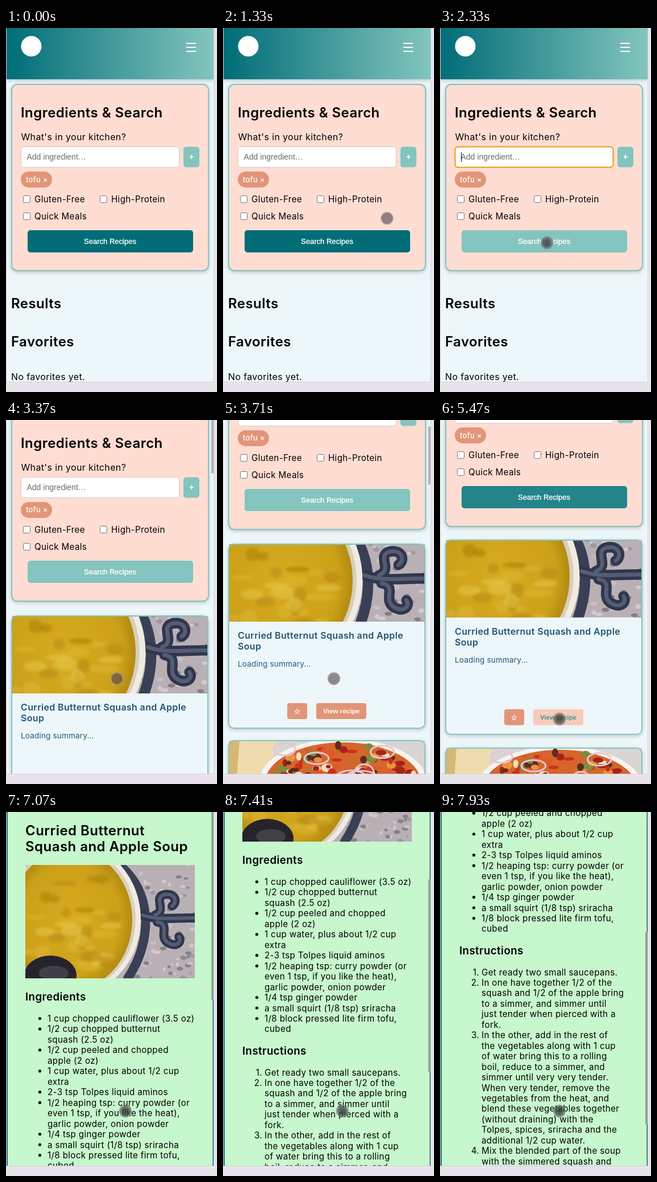
Animation, 371 px wide and 639 px high, one loop 8 s. Source, as an HTML page:

```html
<!DOCTYPE html>
<html lang="en">
<head>
<meta charset="utf-8">
<title>Recipe finder</title>
<style>
html, body { margin: 0; width: 100%; height: 100%; overflow: hidden; background: #e9e4ec; }
#stage { display: block; width: 371px; height: 639px; }
text { font-family: Inter, "Open Sans", sans-serif; font-size: 16px; letter-spacing: .022em; white-space: pre; }
.h2 { font-size: 24px; font-weight: 600; letter-spacing: .019em; }
.h3 { font-size: 18.7px; font-weight: 600; }
.small { font-size: 15.2px; }
.name { font-weight: 600; fill: #1f5577; }
.note { font-size: 13.6px; fill: #1f5b79; letter-spacing: .01em; }
.tag { font-size: 13px; font-weight: 500; fill: #fff; }
.ui { font-family: "Liberation Sans", Arial, sans-serif; font-size: 13px; letter-spacing: 0; }
.firm { fill: #fff; stroke: #fff; stroke-width: .35px; }
.star { font: bold 13px "DejaVu Sans", sans-serif; }
.mid { text-anchor: middle; }
.end { text-anchor: end; }
.box { filter: drop-shadow(0 2px 3px rgba(0, 0, 0, .2)); }
</style>
</head>
<body>
<svg id="stage" viewBox="0 0 371 639"></svg>
<script>
const DARK = [0, 109, 119], LIGHT = [131, 197, 190], CLAY = [226, 149, 120],
      PEACH = [255, 221, 210], WHITE = [255, 255, 255];
const LOOP = 8000;

let seed = 7;
const rand = (a, b) => {
  seed = (seed * 16807) % 2147483647;
  return a + (b - a) * seed / 2147483647;
};
const pick = list => list[Math.floor(rand(0, list.length))];
const many = (n, make) => Array.from({ length: n }, make).join('');

const text = (x, y, s, cls = '', extra = '') => `<text x="${x}" y="${y}" class="${cls}" ${extra}>${s}</text>`;
const rect = (x, y, w, h, fill, r = 0, extra = '') =>
  `<rect x="${x}" y="${y}" width="${w}" height="${h}" rx="${r}" fill="${fill}" ${extra}/>`;
const oval = (x, y, rx, ry, fill, extra = '') =>
  `<ellipse cx="${x}" cy="${y}" rx="${rx}" ry="${ry}" fill="${fill}" ${extra}/>`;
const line = (d, color, w) =>
  `<path d="${d}" fill="none" stroke="${color}" stroke-width="${w}" stroke-linecap="round"/>`;
const photo = (x, y, w, h, id, vw, vh) =>
  `<svg x="${x}" y="${y}" width="${w}" height="${h}" viewBox="0 0 ${vw} ${vh}" preserveAspectRatio="xMidYMid slice"><use href="#${id}"/></svg>`;

function soup() {
  const lace = many(110, () => oval(rand(150, 298), rand(0, 199), rand(2, 6), rand(2, 4),
    pick(['#ddd5d6', '#978e98', '#cec6c9', '#706a7a']), 'opacity=".7"'));
  const lumps = many(30, () => oval(rand(0, 160), rand(10, 180), rand(8, 25), rand(4, 12),
    pick(['#e8c94e', '#a87a08', '#dfb835', '#b5850f']), 'opacity=".5"'));
  const arms = ['M206 88C235 98 260 92 300 93', 'M228 88C250 80 224 58 244 52C264 48 268 66 258 72',
    'M232 100C256 104 234 124 250 136C266 146 276 134 270 126'];
  return rect(0, 0, 298, 199, '#b9b0b5') + lace +
    line('M165 0C222 45 226 130 180 199', '#394056', 16) +
    arms.map(d => line(d, '#30364c', 16)).join('') +
    arms.map(d => line(d, '#555d74', 6)).join('') +
    oval(85, 95, 118, 132, '#f0ebe1') + oval(80, 95, 114, 128, '#d9cfba') + oval(80, 96, 108, 123, 'url(#broth)') +
    `<g filter="url(#soft)">${lumps}</g>` +
    oval(44, 194, 46, 35, '#26242a') + oval(50, 190, 26, 13, '#56545a', 'opacity=".6"');
}

function salad() {
  const bits = many(150, () => {
    const a = rand(0, 6.28), r = Math.sqrt(rand(0, 1));
    return oval(200 + 128 * r * Math.cos(a), 72 + 66 * r * Math.sin(a), rand(4, 10), rand(3, 8),
      pick(['#c9311c', '#dd5a25', '#e9933f', '#f0dfbb', '#a3231b', '#7d8c3b', '#5b2c22']));
  });
  const rings = many(9, () => oval(rand(90, 300), rand(5, 100), rand(16, 32), rand(8, 18), 'none',
    'stroke="#e6c6d3" stroke-width="3"'));
  return rect(0, 0, 344, 136, '#d9d5d3') + '<path d="M0 0H80L64 136H0z" fill="#eedcae"/>' +
    '<path d="M0 0H18L8 136H0z" fill="#d5b873"/>' +
    oval(200, 74, 148, 78, '#f7f4f1') + oval(200, 74, 137, 71, '#d6652c') + bits + rings;
}

function card(id, image, title) {
  return rect(9, 0, 347, 325, '#edf6f9', 10, `class="box" id="${id}Back"`) +
    `<g clip-path="url(#top)">${image}</g>` +
    rect(10, 1, 345, 323, 'none', 9, `id="${id}Edge" stroke="#83c5be" stroke-width="2"`) +
    title.map((s, i) => text(26, 167 + 19 * i, s, 'name')).join('') +
    text(26, 216, 'Loading summary...', 'note') +
    `<g id="${id}Foot">` + rect(113, 280, 35, 28, '#e29578', 4) +
    text(130.5, 299, '☆', 'mid firm star') +
    rect(164, 280, 88, 28, '#e29578', 4, `id="${id}View"`) +
    text(208, 298, 'View recipe', 'ui mid', `id="${id}Label" fill="#fff" style="font-size:11.7px;font-weight:bold"`) + '</g>';
}

const check = (x, y, s) => rect(x + .5, y + .5, 12, 12, '#fff', 2, 'stroke="#767676"') + text(x + 20, y + 12, s, 'small');

const home = `
  <rect x="0" y="0" width="366" height="4000" fill="#edf6f9"/>
  ${rect(1, -30, 364, 120, 'url(#bar)', 0, 'class="box"')}
  <circle cx="44.5" cy="32" r="18" fill="#fff"/>
  ${[26, 33, 40].map(y => rect(317, y, 17, 2, '#fff')).join('')}
  ${rect(10, 99, 346, 327, '#ffddd2', 10, 'class="box" stroke="#83c5be" stroke-width="2"')}
  ${text(26, 157, 'Ingredients &amp; Search', 'h2')}
  ${text(26.5, 197, "What's in your kitchen?")}
  ${rect(26.5, 208.5, 278, 36, '#fff', 5, 'id="field"')}
  ${text(36.5, 231, 'Add ingredient…', 'ui', 'style="font-size:14px" fill="#6a6a6a"')}
  ${rect(37, 218, 1, 17, '#000', 0, 'id="caret"')}
  ${rect(312, 208.5, 28, 36, '#83c5be', 5)}
  ${text(326, 231, '+', 'ui mid', 'fill="#fff" style="font-weight:bold;font-size:14px"')}
  ${rect(26, 252, 55, 28, '#e29578', 14)}${text(35, 270.5, 'tofu ×', 'tag')}
  ${check(30, 294, 'Gluten-Free')}${check(165, 294, 'High-Protein')}${check(30, 324, 'Quick Meals')}
  ${rect(38, 355, 291, 39, '#006d77', 5, 'id="search"')}
  ${text(183, 379, 'Search Recipes', 'ui mid firm')}
  <g id="empty">${text(9, 492, 'Results', 'h2')}${text(9, 559, 'Favorites', 'h2')}${text(9, 618, 'No favorites yet.')}</g>
  <g id="cards">
    <g id="first">${card('a', photo(11, 1, 344, 136, 'soup', 298, 199), ['Curried Butternut Squash and Apple', 'Soup'])}</g>
    <g id="second">${card('b', photo(11, 1, 344, 136, 'salad', 344, 136), [])}</g>
  </g>`;

const ingredients = ['*1 cup chopped cauliflower (3.5 oz)', '*1/2 cup chopped butternut', 'squash (2.5 oz)',
  '*1/2 cup peeled and chopped', 'apple (2 oz)', '*1 cup water, plus about 1/2 cup', 'extra',
  '*2-3 tsp Tolpes liquid aminos', '*1/2 heaping tsp: curry powder (or', 'even 1 tsp, if you like the heat),',
  'garlic powder, onion powder', '*1/4 tsp ginger powder', '*a small squirt (1/8 tsp) sriracha',
  '*1/8 block pressed lite firm tofu,', 'cubed'];
const steps = ['*Get ready two small saucepans.', '*In one have together 1/2 of the',
  'squash and 1/2 of the apple bring', 'to a simmer, and simmer until', 'just tender when pierced with a', 'fork.',
  '*In the other, add in the rest of', 'the vegetables along with 1 cup', 'of water bring this to a rolling',
  'boil, reduce to a simmer, and', 'simmer until very very tender.', 'When very tender, remove the',
  'vegetables from the heat, and', 'blend these vegetables together', '(without draining) with the',
  'Tolpes, spices, sriracha and the', 'additional 1/2 cup water.', '*Mix the blended part of the soup',
  'with the simmered squash and'];

// Lines that begin an item carry a leading star.
function list(lines, y, numbered) {
  let n = 0;
  return lines.map((s, i) => {
    const base = y + 18.46 * i, starts = s[0] === '*';
    const mark = !starts ? '' : numbered ? text(69, base, ++n + '.', 'small end') : oval(59.5, base - 5.5, 2.6, 2.6, '#000');
    return mark + text(73, base, starts ? s.slice(1) : s, 'small');
  }).join('');
}

const recipe = `
  ${rect(1, 0, 364, 621, '#c7f7cc')}
  <g id="sheet">
    ${text(34, 40.5, 'Curried Butternut', 'h2')}${text(34, 68.5, 'Squash and Apple Soup', 'h2')}
    ${photo(34, 93, 298, 199, 'soup', 298, 199)}
    ${text(34, 331, 'Ingredients', 'h3')}${list(ingredients, 368, false)}
    ${text(34, 666, 'Instructions', 'h3')}${list(steps, 702.5, true)}
  </g>
  ${rect(1, 0, 2, 621, '#1c6f79')}${rect(363.5, 0, 2, 621, '#1c6f79')}`;

document.getElementById('stage').innerHTML = `
  <defs>
    <linearGradient id="bar"><stop stop-color="#006d77"/><stop offset="1" stop-color="#83c5be"/></linearGradient>
    <radialGradient id="broth"><stop stop-color="#d6ab20"/><stop offset=".8" stop-color="#cca119"/><stop offset="1" stop-color="#b48a12"/></radialGradient>
    <radialGradient id="press"><stop stop-color="#2e3536" stop-opacity=".85"/><stop offset=".65" stop-color="#3c4344" stop-opacity=".75"/><stop offset="1" stop-color="#777" stop-opacity=".6"/></radialGradient>
    <filter id="soft"><feGaussianBlur stdDeviation="2"/></filter>
    <clipPath id="page"><rect x="1" width="364.5" height="621"/></clipPath>
    <clipPath id="top"><rect x="10" y="1" width="345" height="136"/></clipPath>
    <g id="soup">${soup()}</g><g id="salad">${salad()}</g>
  </defs>
  ${rect(0, 0, 371, 639, '#e9e4ec')}
  <g clip-path="url(#page)">
    <g id="home">${home}</g><g id="recipe">${recipe}</g>
    ${rect(361, 0, 4, 102, '#b3b1b7', 0, 'id="thumb"')}
  </g>
  <path d="M.5 0V621.5H365.5V0" fill="none" stroke="#d3ced8"/>
  <g id="cursor"><circle id="dot" r="10.5" stroke-width="2"/></g>`;

const el = {};
document.querySelectorAll('[id]').forEach(e => el[e.id] = e);
const set = (id, attrs) => { for (const k in attrs) el[id].setAttribute(k, attrs[k]); };
const show = (id, on) => el[id].style.display = on ? '' : 'none';
const move = (id, x, y) => set(id, { transform: `translate(${x} ${y})` });
const mix = (a, b, k) => `rgb(${a.map((v, i) => Math.round(v + (b[i] - v) * k))})`;

// Progress in n equal jumps, the first at a and the last at b; the slack absorbs 10 ms rounding.
const jumps = (t, a, b, n) => t < a ? 0 : Math.min(1, (Math.floor((t - a) / (b - a) * (n - 1) + .1) + 1) / n);
const out = (x, p) => 1 - Math.pow(1 - x, p);
const clamp = x => Math.max(0, Math.min(1, x));

function draw(t) {
  const inRecipe = t >= 6020, found = t >= 2460, focus = t >= 2000 && t < 2460;
  const hover = out(clamp((t - 5335) / 280), 2);
  const searchHover = jumps(t, 2000, 2270, 5) - hover;

  const scroll = 237 * out(jumps(t, 3300, 3780, 8), 2.115) + 2 * jumps(t, 4860, 5070, 3);
  const read = 432 * jumps(t, 7070, 7600, 9) + (t >= 7930 ? 32 : 0);
  const grow = t >= 4000 ? 18 : 0;

  show('home', !inRecipe);
  show('recipe', inRecipe);
  move('home', 0, -scroll);
  move('sheet', 0, 48 - read);

  show('cards', found);
  show('empty', !found);
  show('caret', focus);
  set('field', { stroke: focus ? '#e59b12' : '#ccc', 'stroke-width': focus ? 2 : 1 });
  set('search', { fill: mix(DARK, LIGHT, searchHover) });

  move('first', 0, 451 - 3 * hover);
  move('second', 0, 796 + grow);
  set('aBack', { height: 325 + grow });
  set('aEdge', { height: 323 + grow });
  move('aFoot', 0, grow);
  set('aView', { fill: mix(CLAY, PEACH, hover) });
  set('aLabel', { fill: mix(WHITE, DARK, hover) });

  show('thumb', inRecipe ? t >= 7070 : t >= 3300 && t < 4790);
  set('thumb', inRecipe
    ? { y: -33 + .525 * read, height: 338, fill: '#8aa893' }
    : { y: -26 + .16 * scroll, height: 102, fill: '#b3b1b7' });

  const a = jumps(t, 1120, 1740, 10), b = jumps(t, 2760, 3030, 5), c = jumps(t, 4000, 4790, 11);
  const pressed = t >= 2000 && t < 2600 || t >= 5335;
  show('cursor', t >= 720);
  move('cursor', 355.5 - 167.5 * a + 7 * b + 15 * c, 305.5 + 71.5 * a + 77 * b + 71 * c);
  set('dot', pressed
    ? { fill: 'url(#press)', stroke: 'rgba(120,125,125,.45)' }
    : { fill: 'rgba(75,65,75,.6)', stroke: 'rgba(165,160,165,.6)' });
}

const start = performance.now();
function tick() {
  draw((performance.now() - start) % LOOP);
  requestAnimationFrame(tick);
}
tick();
</script>
</body>
</html>
```
